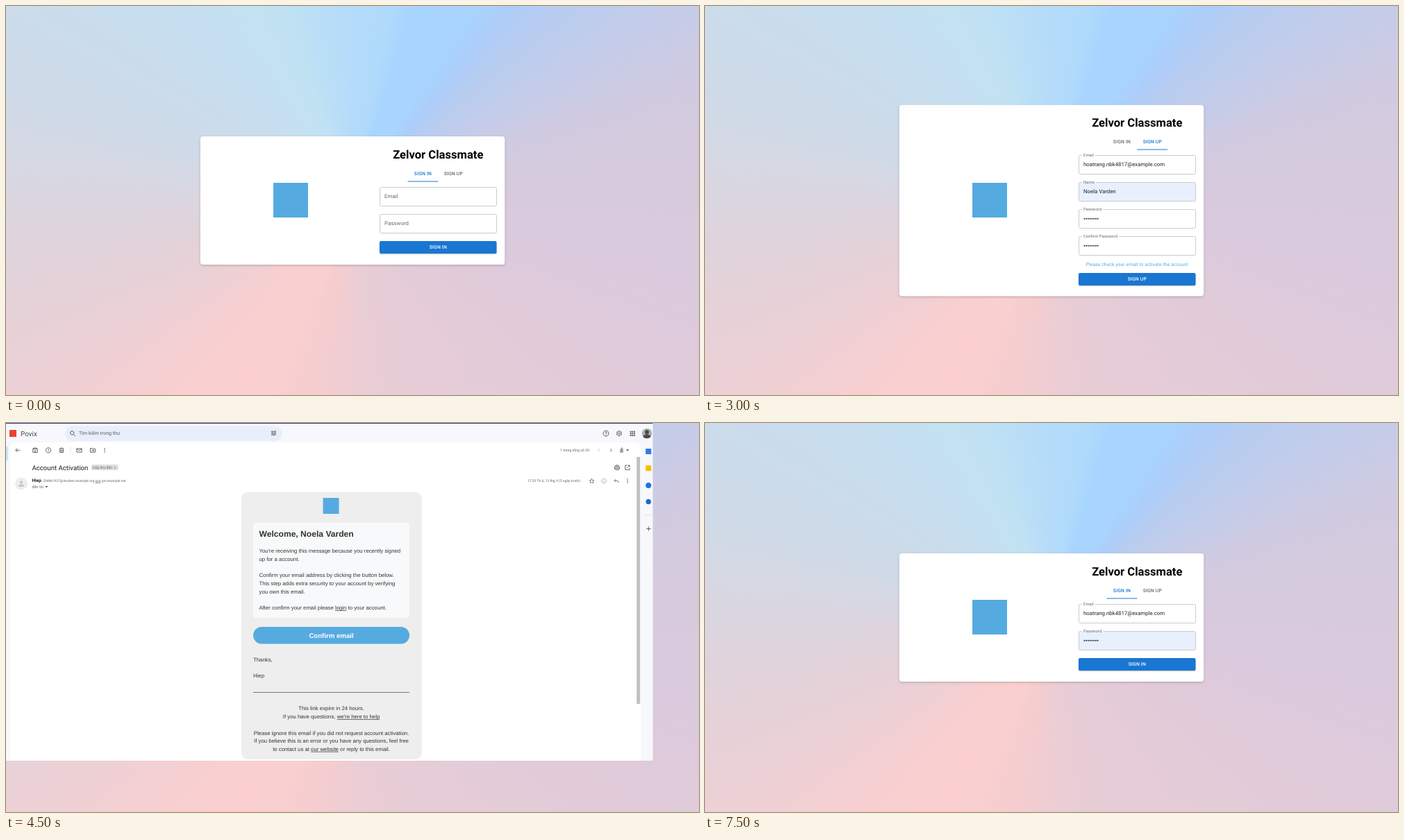
An HTML page with a canvas that plays this animation: 998 px wide and 561 px high, repeating every 8000 ms.

```html
<!DOCTYPE html>
<html lang="en">
<head>
<meta charset="utf-8">
<title>Account activation</title>
<style>
html, body { margin: 0; width: 100%; height: 100%; overflow: hidden; }
canvas { display: block; width: 998px; height: 561px; }
</style>
</head>
<body>
<canvas id="stage" width="998" height="561"></canvas>
<script>
const ctx = document.getElementById('stage').getContext('2d');
const W = 998, H = 561, LOOP = 8000, STEP = 1500;
const ROBOTO = 'Roboto, sans-serif', ARIAL = '"Liberation Sans", Arial, sans-serif';
const BLUE = '#1976d2', SKY = '#55abe0', INK = '#444746';
const APP = 'Zelvor Classmate', PERSON = 'Noela Varden', SENDER = 'Hiep';
const EMAIL = 'hoatrang.nbk4817@example.com';

// Angle in degrees clockwise from the top, colour
const RAYS = [
  [0, '#b4dbfa'], [11, '#b0dafb'], [17, '#a8d5ff'], [32, '#a8d4fe'], [39, '#adcdf9'],
  [47, '#b8cdf0'], [61, '#c6cce8'], [69, '#cfcbe2'], [75, '#d3cbdf'], [90, '#d8cadd'],
  [108, '#dccadd'], [120, '#e0cbda'], [135, '#e3cbd8'], [160, '#e6cdd7'], [176, '#eacdd5'],
  [182, '#efcdd2'], [192, '#f5cdcf'], [201, '#f9cfcf'], [210, '#fbcfcf'], [222, '#f9cfd0'],
  [236, '#f0d0d4'], [243, '#ead1d6'], [255, '#e4d2d9'], [268, '#dcd5df'], [279, '#d5d9e4'],
  [287, '#cfdae8'], [300, '#cbdceb'], [315, '#c7dff0'], [326, '#c4e1f1'], [339, '#c1e2f3'],
  [347, '#bbdff6'], [360, '#b4dbfa']
];
const backdrop = ctx.createConicGradient(-Math.PI / 2, 499, 280.5);
RAYS.forEach(([deg, color]) => backdrop.addColorStop(deg / 360, color));

function rect(x, y, w, h, color) {
  ctx.fillStyle = color;
  ctx.fillRect(x, y, w, h);
}

function box(x, y, w, h, r, fill, line) {
  ctx.beginPath();
  ctx.roundRect(x, y, w, h, r);
  if (fill) { ctx.fillStyle = fill; ctx.fill(); }
  if (line) { ctx.strokeStyle = line; ctx.lineWidth = 1; ctx.stroke(); }
}

function shadowBox(x, y, w, h, r, fill, color, blur, dy) {
  ctx.save();
  ctx.shadowColor = color;
  ctx.shadowBlur = blur;
  ctx.shadowOffsetY = dy;
  box(x, y, w, h, r, fill);
  ctx.restore();
}

function dot(x, y, r, color) {
  ctx.beginPath();
  ctx.arc(x, y, r, 0, Math.PI * 2);
  ctx.fillStyle = color;
  ctx.fill();
}

function text(str, x, y, font, color, align = 'left', spacing = 0) {
  ctx.font = font;
  ctx.letterSpacing = spacing + 'px';
  ctx.textAlign = align;
  ctx.fillStyle = color;
  ctx.fillText(str, x, y);
}

// Draws a line from pieces; pieces starting with "_" are underlined
function linkLine(parts, x, y, font, color, centered) {
  ctx.font = font;
  ctx.letterSpacing = '0px';
  const plain = parts.map(p => p.replace('_', ''));
  if (centered) x -= ctx.measureText(plain.join('')).width / 2;
  parts.forEach((part, i) => {
    text(plain[i], x, y, font, color);
    const w = ctx.measureText(plain[i]).width;
    if (part[0] === '_') rect(x, y + 0.9, w, 0.7, color);
    x += w;
  });
}

// Icon paths live on a 24 unit grid centred on (x, y)
const ICONS = {
  back: 'M20 12H5M11 5L4 12l7 7',
  archive: 'M4 7v13h16V7zM4 7l2-3h12l2 3M12 10v7M9 14l3 3 3-3',
  report: 'M12 3a9 9 0 1 0 .01 0zM12 7v6M12 15v2',
  trash: 'M6 7v13h12V7M4 6h16M9 4h6M10 10v7M14 10v7',
  mail: 'M3 6h18v13H3zM3 7l9 6 9-6',
  folder: 'M3 5h7l2 2h9v12H3zM8 13h7M13 10l3 3-3 3',
  left: 'M14 7l-5 5 5 5',
  right: 'M10 7l5 5-5 5',
  search: 'M10 3a6.5 6.5 0 1 0 .01 0zM15 15l6 6',
  tune: 'M3 6h10M17 6h4M16 3v6M3 12h4M11 12h10M8 9v6M3 18h10M17 18h4M14 15v6',
  help: 'M12 2a10 10 0 1 0 .01 0zM9 10a3 3 0 1 1 4 2.8c-1 .5-1 1-1 2.2M12 16v2',
  gear: 'M12 4a8 8 0 1 0 .01 0zM12 9a3 3 0 1 0 .01 0zM12 1v3M12 20v3M2.5 6.5l2.6 1.5M19 16l2.5 1.5M2.5 17.5L5 16M19 8l2.5-1.5',
  print: 'M7 8V4h10v4M6 17H3V9h18v8h-3M7 14h10v6H7z',
  open: 'M11 4H4v16h16v-7M14 4h6v6M20 4L10 14',
  star: 'M12 3l2.7 6.2 6.6.6-5 4.4 1.5 6.6-5.8-3.5-5.8 3.5 1.5-6.6-5-4.4 6.6-.6z',
  smile: 'M12 3a9 9 0 1 0 .01 0zM8 14c2 4 6 4 8 0M9 8v2M15 8v2',
  reply: 'M9 5l-5 5 5 5M4 10h9q7 0 7 8',
  plus: 'M12 4v16M4 12h16',
  pen: 'M8 9h8v10H8zM10 4h4v4M12 12v4'
};
for (const name in ICONS) ICONS[name] = new Path2D(ICONS[name]);

function icon(name, x, y, color = INK, width = 2.1, scale = 0.4) {
  ctx.save();
  ctx.translate(x - 12 * scale, y - 12 * scale);
  ctx.scale(scale, scale);
  ctx.strokeStyle = color;
  ctx.lineWidth = width;
  ctx.stroke(ICONS[name]);
  ctx.restore();
}

function kebab(x, y) {
  for (let i = -1; i <= 1; i++) dot(x, y + i * 2.4, 0.75, INK);
}

function caret(x, y) {
  ctx.beginPath();
  ctx.moveTo(x - 2, y - 1);
  ctx.lineTo(x + 2, y - 1);
  ctx.lineTo(x, y + 1.2);
  ctx.fillStyle = INK;
  ctx.fill();
}

function field(y, { label, value, filled }) {
  box(538.5, y, 168, 27, 2, filled ? '#e8f0fe' : '#fff', '#cbcbcf');
  const grey = 'rgba(0,0,0,.6)';
  if (!value) {
    text(label, 545, y + 15, '7.8px ' + ROBOTO, grey, 'left', 0.073);
    return;
  }
  const small = '5.85px ' + ROBOTO;
  ctx.font = small;
  ctx.letterSpacing = '0.055px';
  rect(543, y - 1, ctx.measureText(label).width + 4, 1.6, '#fff');
  text(label, 545, y + 1.7, small, grey, 'left', 0.055);
  if (value === '*') {
    for (let i = 0; i < 8; i++) dot(546.4 + i * 2.75, y + 13.2, 0.95, '#222');
  } else {
    text(value, 545, y + 15.4, '7.8px ' + ROBOTO, 'rgba(0,0,0,.87)');
  }
}

function form({ top, height, first, tab, fields, note, button }) {
  rect(0, 0, W, H, backdrop);
  shadowBox(279.8, top, 438.5, height, 4, '#fff', 'rgba(0,0,0,.2)', 3.5, 1.3);
  rect(385, 255, 50, 50, SKY);

  const mid = 622.3, caps = '500 6.82px ' + ROBOTO;
  text(APP, mid, first - 41.5, 'bold 16.6px ' + ROBOTO, '#000', 'center');
  ['SIGN IN', 'SIGN UP'].forEach((name, i) => {
    const active = i === tab;
    text(name, 600.5 + i * 43.8, first - 17.8, caps, active ? BLUE : 'rgba(0,0,0,.6)', 'center', 0.19);
    if (active) rect(578.5 + i * 43.8, first - 9, 43.8, 1, BLUE);
  });
  fields.forEach((f, i) => field(first + i * 39, f));
  if (note) text(note, mid, 374.5, '6.82px ' + ROBOTO, SKY, 'center', 0.073);
  shadowBox(538, button, 168.5, 18, 2, BLUE, 'rgba(0,0,0,.25)', 2, 1);
  text(tab ? 'SIGN UP' : 'SIGN IN', mid, button + 11.1, caps, '#fff', 'center', 0.19);
}

function mailHeader() {
  rect(0, 0, 931.5, 487, '#f6f8fc');
  box(6, 28, 908, 459, [8, 8, 0, 0], '#fff');
  rect(0, 0, 931.5, 1, '#3a3a9c');
  box(-6, 33, 9, 22, 4, '#c2e7ff');
  rect(908.2, 49, 5, 356, '#c1c1c1');

  rect(5, 10, 10, 10, '#ea4335');
  text('Povix', 21, 18.6, '9.9px ' + ROBOTO, INK);
  box(85, 4.5, 313, 21.5, 10.7, '#e9eefb');
  icon('search', 96, 15.2, INK, 2.4);
  text('Tìm kiếm trong thư', 105, 17.4, '7px ' + ROBOTO, '#5a5e63');
  icon('tune', 385.5, 14.6, INK, 2.4);
  icon('help', 864, 15);
  icon('gear', 883, 15);
  for (let i = 0; i < 9; i++) {
    rect(898.7 + (i % 3) * 2.7, 11.7 + Math.floor(i / 3) * 2.7, 1.8, 1.8, INK);
  }

  // Portrait
  ctx.save();
  ctx.beginPath();
  ctx.arc(923, 15, 7.3, 0, Math.PI * 2);
  ctx.clip();
  rect(915, 7, 16, 16, '#aab4b5');
  dot(923, 13, 3, '#4c4a48');
  dot(923, 22, 6, '#4c4a48');
  ctx.restore();
}

function mailTools() {
  const marks = { back: 17, archive: 42, report: 61, trash: 80, mail: 105.5, folder: 125 };
  for (const name in marks) icon(name, marks[name], 39.3);
  rect(92.6, 35, 0.7, 9, '#d5d8dc');
  kebab(142, 39.3);
  text('1 trong tổng số 20', 798, 41.2, '5.2px ' + ROBOTO, '#5f6368');
  icon('left', 854, 39.3, '#b5b7ba');
  icon('right', 871, 39.3);
  icon('pen', 886.5, 39.3);
  caret(895, 39.3);

  text('Account Activation', 37.5, 67.8, '9.65px ' + ROBOTO, '#1f1f1f');
  box(123, 60, 38.5, 8, 1.5, '#dddddd');
  text('Hộp thư đến  ×', 125, 66, '5.1px ' + ROBOTO, '#666');
  icon('print', 880, 64.2);
  icon('open', 895, 64.2);

  dot(22, 87.5, 9, '#eceef0');
  dot(22, 85.5, 1.9, '#c0c4c9');
  box(18.2, 88.4, 7.6, 3.4, [3, 3, 0, 0], '#c0c4c9');
  text(SENDER, 37.5, 85.3, 'bold 6.5px ' + ROBOTO, '#1f1f1f');
  linkLine(['204861937@student.example.org ', '_qua', ' pm.example.net'], 53.3, 85, '4.9px ' + ROBOTO, '#5f6368');
  text('đến tôi', 37.5, 93.8, '5.4px ' + ROBOTO, '#5f6368');
  caret(58.3, 92);
  text('17:20 Th 6, 13 thg 9 (5 ngày trước)', 751, 85, '5px ' + ROBOTO, '#5f6368');
  icon('star', 843.5, 83.6, INK, 1.9, 0.36);
  icon('smile', 861, 83.5, '#a5a8ab', 2, 0.38);
  icon('reply', 879, 83.8, INK, 2.1, 0.36);
  kebab(895, 83.5);

  rect(921.2, 37, 8, 8, '#3478e8');
  rect(921.2, 61.2, 8, 8, '#fbbc04');
  dot(925.2, 90, 4, '#1a73e8');
  dot(925.2, 113.5, 3.7, '#1a67d2');
  rect(920, 132, 10, 0.8, '#dcdfe3');
  icon('plus', 925.4, 152.5);
}

function mailBody() {
  const font = '7.79px ' + ARIAL, color = '#333333', mid = 468.5;
  const line = n => 187.2 + n * 11.7;
  box(339, 99.7, 259.8, 385.3, 9, '#eeeeee');
  rect(456.5, 108, 23, 23, SKY);
  box(356, 144, 225, 137, 4, '#f8f9fa');
  text('Welcome, ' + PERSON, 364.5, 164.2, 'bold 12.1px ' + ARIAL, color);
  [
    [0, "You're receiving this message because you recently signed"],
    [1, 'up for a account.'],
    [3, 'Confirm your email address by clicking the button below.'],
    [4, 'This step adds extra security to your account by verifying'],
    [5, 'you own this email.'],
    [7, 'After confirm your email please ', '_login', ' to your account.']
  ].forEach(([n, ...parts]) => linkLine(parts, 364.5, line(n), font, color));

  box(356, 294, 225, 24.5, 12.2, SKY);
  text('Confirm email', mid, 309.7, 'bold 9.65px ' + ARIAL, '#fff', 'center');
  text('Thanks,', 356, 344, font, color);
  text(SENDER, 356, 367.4, font, color);
  rect(356, 388, 225, 1, '#777');
  [
    [414.4, 'This link expire in 24 hours.'],
    [426.1, 'If you have questions, ', "_we're here to help"],
    [449.5, 'Please ignore this email if you did not request account activation.'],
    [461.2, 'If you believe this is an error or you have any questions, feel free'],
    [472.9, 'to contact us at ', '_our website', ' or reply to this email.']
  ].forEach(([y, ...parts]) => linkLine(parts, mid, y, font, color, true));
}

function inbox() {
  rect(0, 0, W, H, backdrop);
  mailHeader();
  mailTools();
  mailBody();
}

function activated() {
  rect(0, 0, W, H, '#f4f4f9');
  shadowBox(291, 38, 416, 135.5, 5, '#fff', 'rgba(0,0,0,.16)', 5, 0.5);
  ['Account', EMAIL + ' has', 'been activated successfully'].forEach((str, i) =>
    text(str, 499, 83.2 + i * 23.4, 'bold 20.77px ' + ARIAL, SKY, 'center'));
  linkLine(['_Back to Login'], 499, 157.8, 'bold 10.4px ' + ARIAL, '#4caf50', true);
  box(0, 546, 101.5, 15, [0, 2, 0, 0], '#1f1a66');
  text('https://zelvor-classmate.sbs', 3, 556.3, '7.25px "Open Sans", sans-serif', '#fff');
}

const signIn = fields => () => form({
  top: 188, height: 185, first: 261.5, tab: 0, button: 339, fields
});

const scenes = [
  signIn([{ label: 'Email' }, { label: 'Password' }]),
  () => form({
    top: 149.7, height: 261.6, first: 222.5, tab: 1, button: 378,
    fields: ['Email', 'Name', 'Password', 'Confirm Password'].map(label => ({ label }))
  }),
  () => form({
    top: 142.8, height: 275.7, first: 215.5, tab: 1, button: 385,
    note: 'Please check your email to activate the account',
    fields: [
      { label: 'Email', value: EMAIL },
      { label: 'Name', value: PERSON, filled: true },
      { label: 'Password', value: '*' },
      { label: 'Confirm Password', value: '*' }
    ]
  }),
  inbox,
  activated,
  signIn([{ label: 'Email', value: EMAIL }, { label: 'Password', value: '*', filled: true }])
];

function tick() {
  const t = performance.now() % LOOP;
  ctx.textRendering = 'geometricPrecision';
  scenes[Math.floor(t / STEP)]();
  requestAnimationFrame(tick);
}
tick();
</script>
</body>
</html>
```
